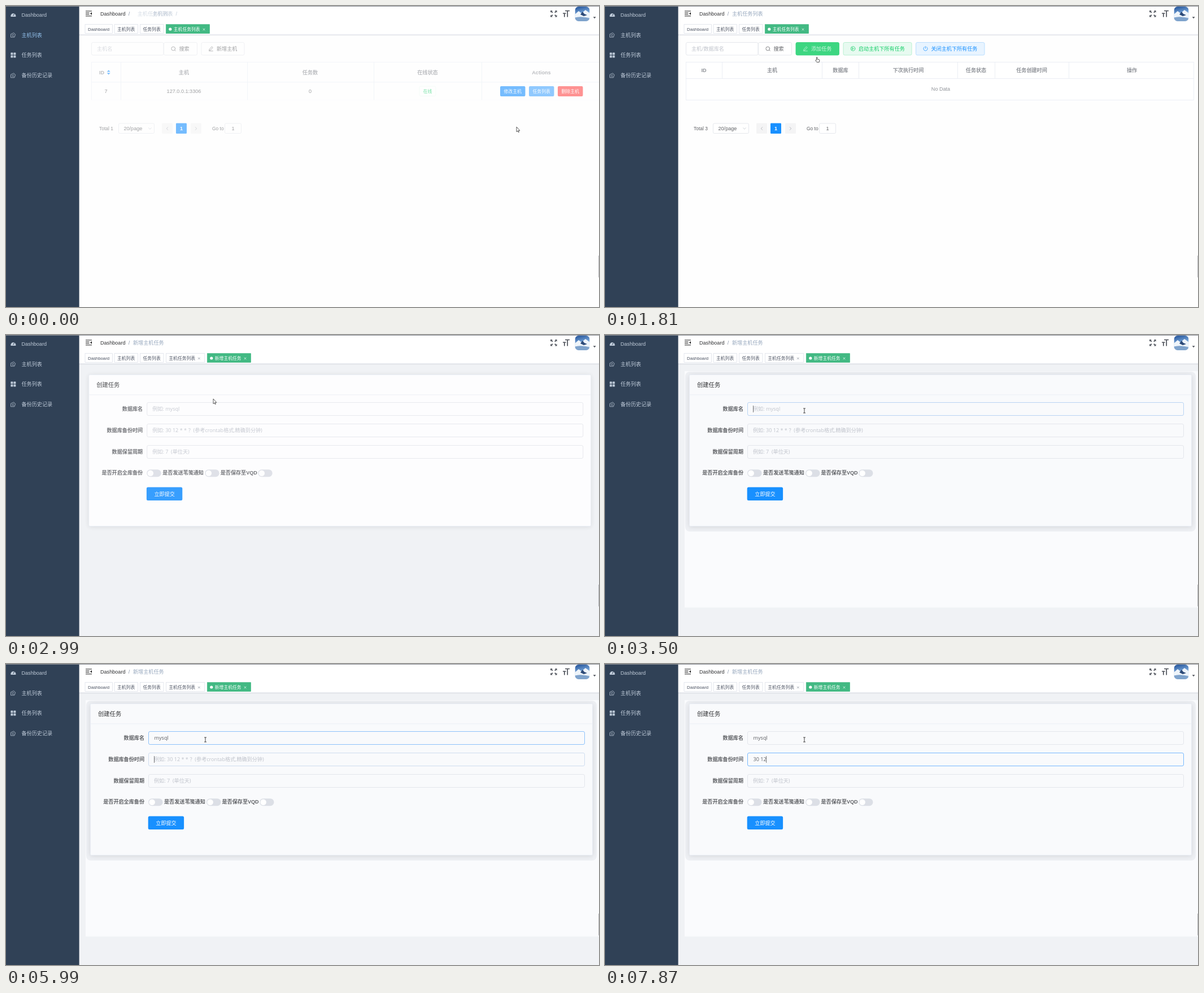
Animation of 1050x533 px, one loop 8 s. Source, as an HTML page:

```html
<!DOCTYPE html>
<html lang="zh-CN">
<head>
<meta charset="utf-8">
<title>创建任务</title>
<style>
html, body { margin: 0; width: 100%; height: 100%; overflow: hidden; background: #fefefe; }
svg { display: block; width: 100%; height: 100%; }
text { font-family: "Liberation Sans", "Noto Sans CJK SC", "Noto Sans CJK", sans-serif; white-space: pre; }
.field { font-family: "Open Sans", "Noto Sans CJK SC", "Noto Sans CJK", sans-serif; }
.card { filter: drop-shadow(0 1px 4px rgba(0, 0, 0, .11)); }
.outline { stroke-width: .7; }
.icon { fill: none; stroke-width: .75; stroke-linecap: round; stroke-linejoin: round; }
</style>
</head>
<body>
<svg id="stage" viewBox="0 0 1050 533" xmlns="http://www.w3.org/2000/svg"></svg>
<script>
const LOOP = 8000, SHIFT = 19.5;
const BLUE = '#1890ff', GREEN = '#13ce66', GREY = '#909399', BORDER = '#dcdfe6', LINE = '#e6eaf2', HINT = '#c0c4cc', INK = '#606266';

// ---- drawing helpers ----
const rect = (x, y, w, h, fill, stroke, r = 0, extra = '') => stroke
  ? `<rect class="outline" x="${x + .5}" y="${y + .5}" width="${w - 1}" height="${h - 1}" rx="${r}" fill="${fill}" stroke="${stroke}" ${extra}/>`
  : `<rect x="${x}" y="${y}" width="${w}" height="${h}" rx="${r}" fill="${fill}" ${extra}/>`;
const text = (x, y, s, { size = 9.1, fill = INK, anchor = 'start', bold = false, extra = '' } = {}) =>
  `<text x="${x}" y="${y + size * .36}" font-size="${size}" fill="${fill}" text-anchor="${anchor}"${bold ? ' font-weight="700"' : ''} ${extra}>${s}</text>`;
const mid = (x, y, s, o = {}) => text(x, y, s, { anchor: 'middle', ...o });
const group = (id, body, extra = '') => `<g id="${id}" ${extra}>${body}</g>`;
const icon = (x, y, d, color, extra = '') =>
  `<path class="icon" transform="translate(${x} ${y})" d="${d}" stroke="${color}" ${extra}/>`;

// Icon paths are centred on 0,0
const ICON = {
  search: 'M3.2 0A3.4 3.4 0 1 1 -3.6 0A3.4 3.4 0 1 1 3.2 0M2.3 2.5L3.8 4',
  edit: 'M-2.6 1L1.4 -3.6L3.2 -2L-.8 2.5L-3 3ZM-3.4 4.2H3.4',
  play: 'M3.8 0A3.8 3.8 0 1 1 -3.8 0A3.8 3.8 0 1 1 3.8 0M-1.1 -1.6L1.6 0L-1.1 1.6Z',
  power: 'M-1.9 -3A3.6 3.6 0 1 0 1.9 -3M0 -4V-.4',
  left: 'M1.2 -2.5L-1.2 0L1.2 2.5',
  right: 'M-1.2 -2.5L1.2 0L-1.2 2.5',
  down: 'M-2.5 -1.2L0 1.2L2.5 -1.2',
  doc: 'M-3.8 -1.8L1 -4L4 -1.2L2.2 3.8H-3.8ZM-2 -.2L1.4 -1.2M-1.6 1.8H1.2',
};

const button = (x, w, label, glyph, [fill, stroke, color]) =>
  rect(x, 64, w, 23.5, fill, stroke, 2.5) + icon(x + 17.5, 75.5, ICON[glyph], color) +
  text(x + 27.5, 75.5, label, { fill: color });
const PLAIN = ['#fff', BORDER, INK];
const SUCCESS = ['#e7faf0', '#a1ebc2', GREEN];
const SUCCESS_HOVER = [GREEN, GREEN, '#fff'];
const PRIMARY = ['#e8f4ff', '#a3d3ff', BLUE];

const searchBox = hint => rect(142, 64, 128.5, 23.5, '#fff', BORDER, 2.5) +
  text(152, 75.5, hint, { fill: HINT, extra: 'class="field"' }) + button(270, 60, '搜索', 'search', PLAIN);

const table = (columns, headBottom, bottom) =>
  rect(142, 99, 900, bottom - 99, '#fff', LINE) + rect(142, headBottom, 900, .8, LINE) +
  columns.map(([x, to]) => rect(x, 99, .8, to - 99, LINE)).join('');
const heads = (y, list) => list.map(([x, s]) => mid(x, y, s, { fill: GREY, bold: true })).join('');

const pager = total =>
  text(156, 216.5, `Total ${total}`, { size: 8.45 }) +
  rect(190, 207.5, 64, 18.5, '#fff', BORDER, 2) + text(199.5, 217, '20/page') + icon(246, 217, ICON.down, HINT) +
  rect(267, 207.5, 19, 18.5, '#f4f4f5', '', 1.3) + icon(276.5, 217, ICON.left, '#a8abb2') +
  rect(292, 207.5, 19, 18.5, BLUE, '', 1.3) + mid(301.5, 216.7, '1', { fill: '#fff', bold: true }) +
  rect(318, 207.5, 19, 18.5, '#f4f4f5', '', 1.3) + icon(327.5, 217, ICON.right, '#a8abb2') +
  text(356, 217, 'Go to', { size: 8.45 }) + rect(378, 207.5, 30, 18.5, '#fff', BORDER, 2) + mid(393, 217, '1');

// ---- views ----
const hostView = () => {
  const action = (x, s, fill) => rect(x, 142, 44.5, 18, fill, '', 2) + mid(x + 22.2, 151, s, { size: 7.8, fill: '#fff' });
  return searchBox('主机名') + button(336.5, 77, '新增主机', 'edit', PLAIN) +
    table([194, 418, 642, 833].map(x => [x, 167]), 134.5, 167.5) +
    rect(141, 166.5, 902, 2, '#fff') +
    heads(117.5, [[160.5, 'ID'], [306, '主机'], [529.5, '任务数'], [737.5, '在线状态'], [939, 'Actions']]) +
    `<path d="M169.7 116.5l3 -3l3 3zM169.7 118.5l3 3l3 -3z" fill="${BLUE}"/>` +
    mid(168, 150.5, '7') + mid(306, 150.5, '127.0.0.1:3306') + mid(529.5, 150.5, '0') +
    rect(722.5, 141.5, 30, 18.5, '#fff', '#e7faf0', 2.5) + mid(737.5, 151, '在线', { size: 7.8, fill: GREEN }) +
    action(866, '修改主机', BLUE) + action(917, '任务列表', '#46a6ff') + action(968, '删除主机', '#ff4949') + pager(1);
};

const taskView = () => searchBox('主机/数据库名') +
  button(336.5, 77.5, '添加任务', 'edit', SUCCESS) +
  group('hover', button(336.5, 77.5, '添加任务', 'edit', SUCCESS_HOVER)) +
  button(420.5, 122, '启动主机下所有任务', 'play', SUCCESS) +
  button(549, 122.5, '关闭主机下所有任务', 'power', PRIMARY) +
  table([206, 383, 448, 623, 689, 820].map(x => [x, 128]), 128, 167) +
  heads(114, [[174, 'ID'], [295, '主机'], [416, '数据库'], [536, '下次执行时间'], [656, '任务状态'], [754.5, '任务创建时间'], [932, '操作']]) +
  mid(593.5, 147, 'No Data', { fill: GREY }) +
  group('loading', rect(141, 98, 902, 70, '#fff', '', 0, 'opacity=".9"') +
    `<circle id="spinner" cx="593" cy="133" r="11" fill="none" stroke="${BLUE}" stroke-width="1.2" stroke-linecap="round" pathLength="360"/>`) +
  group('pager', pager(3));

const HINTS = ['例如: mysql', '例如: 30 12 * * ？(参考crontab格式,精确到分钟)', '例如: 7  (单位天)'];
const formView = () => {
  const label = (y, s) => text(245, y, s, { anchor: 'end', bold: true });
  const toggle = x => rect(x, 238.2, 25.5, 13, BORDER, '', 6.5) + `<circle cx="${x + 6.6}" cy="244.7" r="5.3" fill="#fff"/>`;
  const field = (hint, i) => {
    const y = 119 + 38 * i;
    return rect(252, y, 773, 24, 'transparent', BORDER, 2.5, `id="box${i}"`) +
      text(262, y + 12, hint, { fill: HINT, extra: `class="field" id="hint${i}"` }) +
      text(262.5, y + 12, '', { extra: `class="field" id="value${i}"` }) +
      rect(262, y + 6, .65, 12, '#333', '', 0, `id="caret${i}" display="none"`);
  };
  return group('haze', rect(141, 64, 909, 418.5, '#fafbfd') + rect(142, 65, 904, 283, '#eef0f4', '', 8)) +
    rect(149, 70, 890, 269, '#fff', '#e6ebf5', 2, 'class="outline card" id="card"'.replace('class="outline card" ', 'style="filter:drop-shadow(0 1px 4px rgba(0,0,0,.11))" ')) +
    rect(150, 105.5, 888, .8, '#e9edf4') +
    text(163, 88.5, '创建任务', { size: 10.3, fill: '#303133' }) +
    label(130.5, '数据库名') + label(168.5, '数据库备份时间') + label(206.5, '数据保留周期') + label(244, '是否开启全库备份') +
    HINTS.map(field).join('') +
    toggle(252) + text(280, 244, '是否发送苇笺通知', { bold: true }) +
    toggle(355) + text(382.5, 244, '是否保存至VQD', { bold: true }) + toggle(449) +
    rect(251.7, 269.6, 63.4, 23.4, BLUE, '', 2.5) + mid(283.5, 281.5, '立即提交', { fill: '#fff' });
};

// ---- frame around the views ----
const sidebar = () => {
  const c = '#bfcbd9', item = (y, s, id = '') => text(27.5, y, s, { fill: c, extra: id && `id="${id}"` });
  const cell = (x, y) => rect(x, y, 4, 4, c, '', .6);
  return rect(0, 0, 129.6, 533, '#304156') +
    `<path d="M8.5 19A4.6 4.6 0 1 1 17.3 19Z" fill="${c}"/><path d="M12.9 17.5L14.6 13.5" stroke="#304156"/>` +
    icon(12.7, 51.5, ICON.doc, c) + cell(8.4, 82.5) + cell(13.4, 82.5) + cell(8.4, 87.5) + cell(13.4, 87.5) + icon(12.7, 123, ICON.doc, c) +
    item(15.5, 'Dashboard') + item(51.5, '主机列表', 'navHost') + item(87, '任务列表') + item(123, '备份历史记录');
};

const tab = (x, w, s, { active = false, close = false } = {}) =>
  rect(x, 32.2, w, 16.9, active ? '#42b983' : '#fff', active ? '#42b983' : '#d8dce5') +
  (active ? `<circle cx="${x + 8}" cy="41" r="2.6" fill="#fff"/>` : '') +
  text(x + (active ? 14 : 5.5), 41, s, { size: 7.8, fill: active ? '#fff' : '#495060' }) +
  (close ? icon(x + w - 10.5, 41.5, 'M-1.5 -1.5L1.5 1.5M1.5 -1.5L-1.5 1.5', active ? '#fff' : '#8a919c') : '');

const avatar = () => `<g clip-path="url(#avatarClip)">${rect(1007.5, 1, 26, 26, 'url(#photo)')}
  <path d="M1007 15L1014 9L1019 13L1026 7L1034 13V20H1007Z" fill="#eef4fa"/>
  <path d="M1017 15L1021 10L1024 14L1029 16L1023 18Z" fill="#2c4a78"/>
  <path d="M1007 21Q1016 17 1034 22V28H1007Z" fill="#7fa3cc"/></g>`;

const crumb = (id, s) => text(0, 13.5, s, { fill: '#97a8be', extra: `id="${id}"` });
const header = () => rect(129, 0, 921, 51, '#fff') + rect(129, 50.5, 921, 1, '#d8dce5') +
  rect(129, 51.5, 921, 1, '#000', '', 0, 'opacity=".04"') +
  '<path d="M141 9H152M141 12H147.5M141 14.7H147.5M141 17.7H152" stroke="#222" stroke-width="1.1"/><path d="M152 11V15.7L149 13.4Z" fill="#222"/>' +
  text(167, 13.5, 'Dashboard', { fill: '#303133' }) + mid(218, 13.5, '/', { fill: '#8794a8' }) +
  crumb('outHost', '主机列表  /') + crumb('inTasks', '主机任务列表') + crumb('outTasks', '主机任务列表  /') + crumb('inForm', '新增主机任务') +
  [[1, 1], [-1, 1], [1, -1], [-1, -1]].map(([a, b]) =>
    `<path transform="translate(969.8 13.8) scale(${a} ${b})" d="M5.8 2V5.8H2L3.2 4.6L1.3 2.7L2.7 1.3L4.6 3.2Z" fill="#5a5e66"/>`).join('') +
  '<path d="M990 8.5H998M994.2 8.5V19.5M986 13H991.5M988.8 13V19.5" stroke="#4d5159" stroke-width="1.7"/>' +
  avatar() + '<path d="M1039.6 19.3h5l-2.5 3z" fill="#4d5159"/>' +
  tab(139.5, 49.5, 'Dashboard') + tab(191.5, 42.5, '主机列表') + tab(237, 42.5, '任务列表') +
  group('tabsTasks', tab(282.8, 78.2, '主机任务列表', { active: true, close: true })) +
  group('tabsForm', tab(282.8, 69.5, '主机任务列表', { close: true }) + tab(355.8, 78.2, '新增主机任务', { active: true, close: true }));

const POINTERS =
  group('arrow', '<path d="M0 0V8.8L2 7L3.3 9.8L4.5 9.2L3.3 6.5H5.8Z" fill="#fff" stroke="#333" stroke-width=".8"/>') +
  group('hand', '<path d="M1.4 6V1Q2.2 0 3 1V4.2L6.4 5Q7 5.2 6.9 6L6.2 9.5H2L-.4 6.3Q0 5.2 1.4 6Z" fill="#fff" stroke="#333" stroke-width=".8"/>') +
  group('beam', '<path d="M-2 -4H2M0 -4V4M-2 4H2" stroke="#333" stroke-width=".9"/>');

const stage = document.getElementById('stage');
stage.innerHTML = `<defs><linearGradient id="photo" x2=".25" y2="1">
  <stop stop-color="#1f4f96"/><stop offset=".5" stop-color="#6d9cd2"/><stop offset="1" stop-color="#e6eff8"/></linearGradient>
  <clipPath id="avatarClip">${rect(1007.5, 1, 26, 26, '#fff', '', 6.5)}</clipPath></defs>` +
  rect(129, 0, 921, 533, '#fefefe') + rect(129, 51, 921, 482, '#f0f2f5', '', 0, 'id="backdrop"') +
  group('hosts', hostView()) + group('tasks', taskView()) + group('form', formView()) +
  header() + sidebar() + rect(0, 0, 1050, 1, '#8c9097') + rect(1049.4, 442, .6, 38.5, '#85888d') + POINTERS;

// ---- motion ----
const $ = Object.fromEntries([...stage.querySelectorAll('[id]')].map(e => [e.id, e]));
const clamp = v => Math.min(1, Math.max(0, v));
const lerp = (a, b, p) => a + (b - a) * p;
const mix = (a, b, p) => `rgb(${a.map((v, i) => Math.round(lerp(v, b[i], p)))})`;
const bezier = (x1, y1, x2, y2) => x => {
  const at = (a, b, u) => 3 * a * u * (1 - u) ** 2 + 3 * b * u * u * (1 - u) + u ** 3;
  let lo = 0, hi = 1;
  for (let i = 0; i < 24; i++) { const u = (lo + hi) / 2; at(x1, x2, u) < x ? lo = u : hi = u; }
  return at(y1, y2, lo);
};
const ease = bezier(.25, .1, .25, 1), easeInOut = bezier(.42, 0, .58, 1);
const since = (t, start, span = 500) => clamp((t - start) / span);
const show = (el, on) => el.setAttribute('display', on ? 'inline' : 'none');
const put = (el, x, opacity) => {
  el.setAttribute('transform', `translate(${x} 0)`);
  el.setAttribute('opacity', opacity);
};

// The screen refreshes only at these moments
const TICKS = [0, 120, 240, 380, 500, 620, 770, 910, 1030, 1150, 1270, 1420, 1540, 1660, 1810, 1930, 2210, 2330, 2480, 2600,
  2750, 2870, 2990, 3110, 3230, 3380, 3500, 3650, 4030, 4530, 4650, 4940, 5060, 5560, 5840, 5990, 6110, 6390, 7080, 7200, 7350, 7720, 7870];
const OPEN_TASKS = -125, OPEN_FORM = 2210;
const PATH = [[0, 904, 214], [240, 844, 286], [1150, 844, 286], [1270, 821, 284], [1660, 372, 115], [1810, 373, 90],
  [1930, 374, 83], [2600, 374, 83], [2990, 367, 113], [3230, 353, 134], [LOOP, 353, 134]];
const TYPED = [
  { word: 'mysql', keys: [4650, 4940, 5060, 5560, 5840], focus: 3420, blur: 5950, caret: [3380, 5990], off: [4030, 4530] },
  { word: '30 12', keys: [7080, 7200, 7350, 7720, 7870], focus: 5950, blur: LOOP, caret: [5990, LOOP], off: [6390, 7080] },
];

function drawPointer(t) {
  const i = PATH.findIndex(k => k[0] > t), [t0, x0, y0] = PATH[i - 1], [t1, x1, y1] = PATH[i];
  const p = (t - t0) / (t1 - t0);
  const kind = t >= 3230 ? 'beam' : t >= 1810 && t < 2750 ? 'hand' : 'arrow';
  for (const k of ['arrow', 'hand', 'beam']) show($[k], k === kind);
  $[kind].setAttribute('transform', `translate(${lerp(x0, x1, p)} ${lerp(y0, y1, p)})`);
}

function drawSpinner(t) {
  const age = Math.max(0, t - 320), phase = age % 1500 / 750, round = 360 / 125.7;
  const p = easeInOut(phase % 1), first = phase < 1;
  const length = (first ? lerp(1, 90, p) : 90) * round;
  const start = (first ? lerp(0, 40, p) : lerp(40, 120, p)) * round;
  const visible = Math.min(length, 360 - start);
  $.spinner.setAttribute('stroke-dasharray', `${visible} 400`);
  $.spinner.setAttribute('transform', `rotate(${age * .18 + start} 593 133)`);
  $.loading.setAttribute('opacity', 1 - since(t, 900, 300));
}

function drawField(f, i, t) {
  const s = f.word.slice(0, f.keys.filter(k => k <= t).length);
  const value = $['value' + i], caret = $['caret' + i];
  if (value.textContent !== s) value.textContent = s;
  show($['hint' + i], !s);
  const glow = since(t, f.focus, 200) - since(t, f.blur, 200);
  $['box' + i].setAttribute('stroke', mix([220, 223, 230], [64, 158, 255], glow));
  show(caret, t >= f.caret[0] && t < f.caret[1] && !(t >= f.off[0] && t < f.off[1]));
  caret.setAttribute('x', 262.3 + (s ? value.getComputedTextLength() : 0));
}

function draw(t) {
  const a = ease(since(t, OPEN_TASKS)), aIn = ease(since(t, OPEN_TASKS + 500));
  const b = ease(since(t, OPEN_FORM)), bIn = ease(since(t, OPEN_FORM + 500));
  const formOpen = t >= OPEN_FORM;

  put($.hosts, 1 + SHIFT * a, 1 - a);
  put($.tasks, 1 + SHIFT * (aIn - 1 + b), aIn * (1 - b));
  put($.form, SHIFT * (bIn - 1), bIn);
  $.backdrop.setAttribute('opacity', clamp(bIn * 1.2));

  put($.outHost, 253.7 + 13 * a, 1 - a);
  put($.inTasks, 225 + 13 * (1 - a), formOpen ? 0 : a);
  put($.outTasks, 249.3 + 13 * b, formOpen ? 1 - b : 0);
  put($.inForm, 225 + 13 * (1 - b), b);
  show($.tabsTasks, !formOpen);
  show($.tabsForm, formOpen);
  $.navHost.setAttribute('fill', mix([149, 195, 238], [191, 203, 217], since(t, 0, 200)));

  show($.pager, t >= 770);
  $.hover.setAttribute('opacity', since(t, 1730, 100));
  drawSpinner(t);

  const settled = t >= 3230;
  show($.haze, settled);
  $.card.setAttribute('fill', settled ? '#f9fafc' : '#fff');
  TYPED.forEach((f, i) => drawField(f, i, t));
  drawPointer(t);
}

const origin = performance.now();
function frame() {
  const t = Math.max(0, performance.now() - origin) % LOOP;
  draw(TICKS.findLast(k => k <= t));
  requestAnimationFrame(frame);
}
frame();
</script>
</body>
</html>
```
